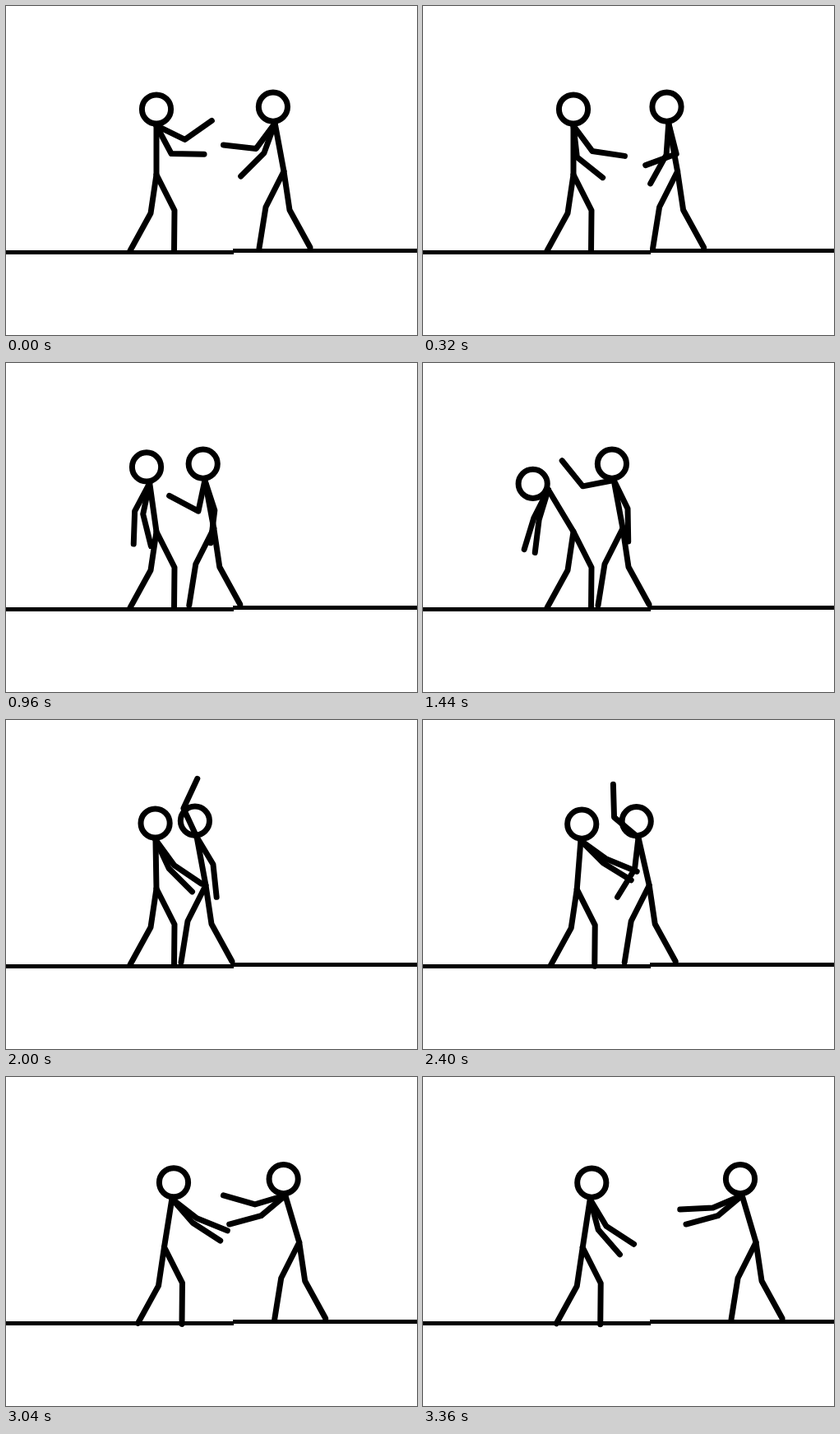
These frames come from a looping animation (500x400 px, 3440 ms). An HTML page with a canvas:

```html
<!DOCTYPE html>
<html lang="en">
<head>
<meta charset="utf-8">
<title>Stick figure scuffle</title>
<style>
html, body { margin: 0; width: 100%; height: 100%; overflow: hidden; background: #fff; }
canvas { display: block; }
</style>
</head>
<body>
<canvas id="stage" width="500" height="400"></canvas>
<script>
const ctx = document.getElementById('stage').getContext('2d');
const STEP = 80, STEPS = 43;
const SPINE = 59.5, NECK = 20, UPPER = 38.5, FOREARM = 40;

// Moments of the fight: guard, wind-up, slap, follow-through, raise, hold, grapple, part
const BEATS = [0, 8, 12, 18, 25, 28, 34, 42];

// A value for each beat, blended in between
const track = (...values) => step => {
  const i = Math.max(1, BEATS.findIndex(b => b >= step));
  const p = (step - BEATS[i - 1]) / (BEATS[i] - BEATS[i - 1]);
  return values[i - 1] + (values[i] - values[i - 1]) * p;
};

// Degrees from hanging straight down, positive towards the opponent
const hit = {
  lean: track(0, 0, -8, -31, -1, 2, 9.5, 8.7),
  near: track(64, 9, -12, -17, 36, 45, 73, 31),
  far: track(28, -15, -28, -27, 25, 34, 67, 15),
  bend: track(61, 29, 26, 10, 20, 17, 6, 26)
};
const slap = {
  near: track(36.5, -65, 12, 79, 155, 155, 80, 67),
  far: track(20, -12, -18, -26, -31, -15, 50, 50),
  bend: track(60, 108, 106, 62, 50, 50, 45, 20)
};

function leftPose(step) {
  const slide = 3 * Math.sqrt(Math.max(0, step - 28));
  const bend = hit.bend(step);
  return {
    x: 183 + slide, y: 205 + slide / 5, facing: 1, stride: 21.5,
    lean: hit.lean(step),
    arms: [[hit.near(step), bend], [hit.far(step), bend]]
  };
}

function rightPose(step) {
  const retreat = 3.85 * Math.max(0, step - 25) ** 1.32;
  return {
    x: Math.max(243, 338 - 7.1 * step) + retreat, y: 201, facing: -1, stride: 30,
    lean: 10.5 + Math.min(6, retreat / 14),
    arms: [[slap.near(step), slap.bend(step)], [slap.far(step), 25]]
  };
}

function reach([x, y], angle, length) {
  const r = angle * Math.PI / 180;
  return [x + length * Math.sin(r), y + length * Math.cos(r)];
}

function stroke(...points) {
  ctx.beginPath();
  points.forEach(p => ctx.lineTo(...p));
  ctx.stroke();
}

function drawFigure({ x, y, facing, stride, lean, arms }) {
  ctx.save();
  ctx.translate(x, y);
  ctx.scale(facing, 1);
  const hip = [0, 0], neck = reach(hip, 180 - lean, SPINE);
  stroke(neck, hip, [-7, 47], [-32, 92.5]);
  stroke(hip, [22, 43.5], [stride, 93.5]);
  for (const [swing, bend] of arms) {
    const elbow = reach(neck, swing, UPPER);
    stroke(neck, elbow, reach(elbow, swing + bend, FOREARM));
  }
  // The head drops further the more the body bends back
  const nod = lean * (1.02 - 0.039 * lean);
  ctx.beginPath();
  ctx.arc(...reach(neck, 180 - nod, NECK), 17.6, 0, 2 * Math.PI);
  ctx.stroke();
  ctx.restore();
}

function draw() {
  const step = Math.floor(performance.now() / STEP) % STEPS;
  ctx.fillStyle = '#fff';
  ctx.fillRect(0, 0, 500, 400);
  ctx.fillStyle = ctx.strokeStyle = '#000';
  ctx.lineWidth = 7;
  ctx.lineCap = ctx.lineJoin = 'round';
  ctx.fillRect(0, 297, 277, 5);
  ctx.fillRect(276, 295, 224, 5);
  drawFigure(leftPose(step));
  drawFigure(rightPose(step));
  requestAnimationFrame(draw);
}
draw();
</script>
</body>
</html>
```
